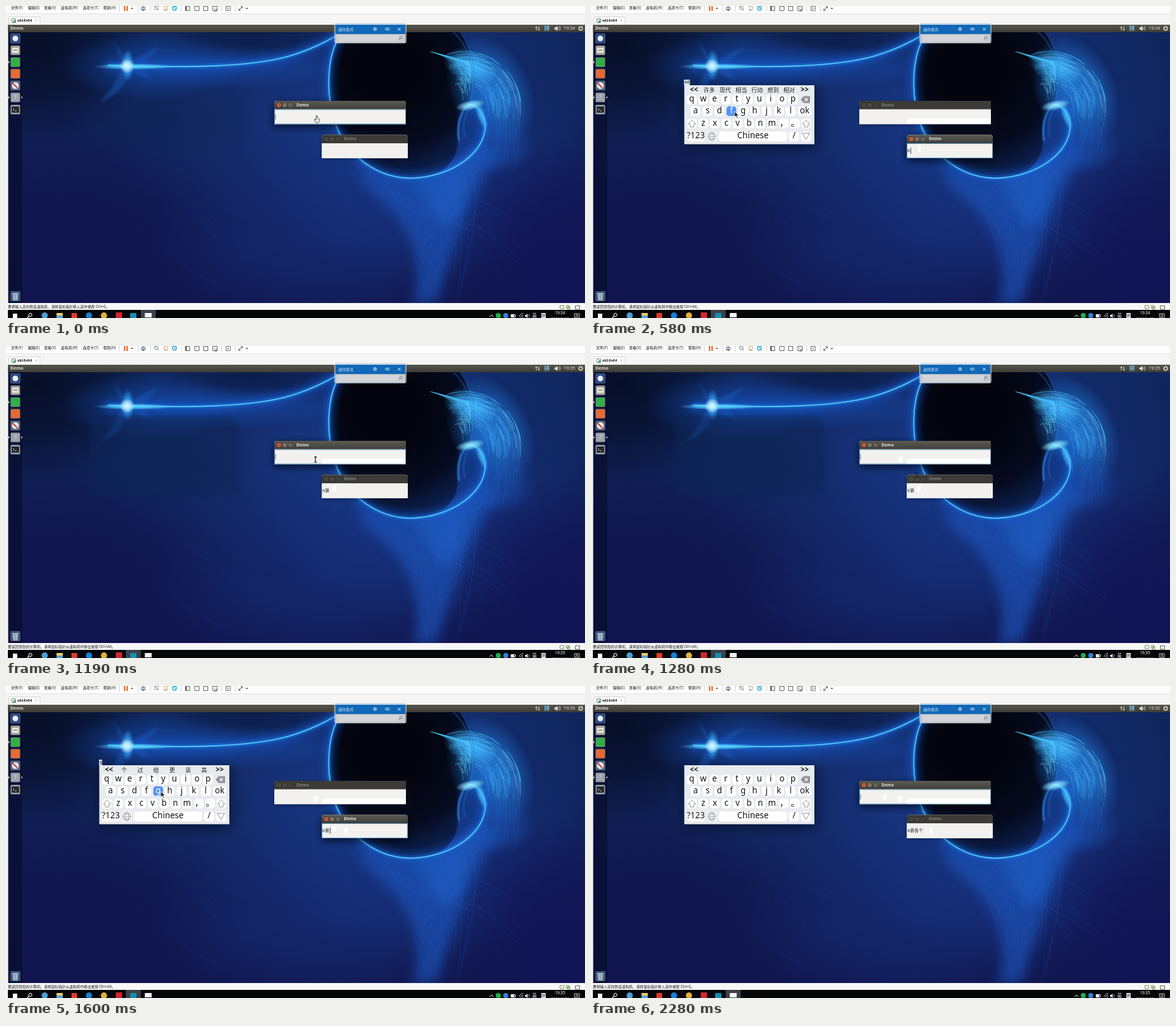
Write an HTML page with a canvas that moves like this. It is 928 px wide and 500 px high and loops after 2.36 s.

```html
<!DOCTYPE html>
<html lang="zh">
<head>
<meta charset="utf-8">
<title>Virtual keyboard demo</title>
<style>
html, body { margin: 0; width: 100%; height: 100%; overflow: hidden; background: #000; }
canvas { display: block; width: 928px; height: 500px; }
</style>
</head>
<body>
<canvas id="stage" width="928" height="500"></canvas>
<script>
const W = 928, H = 500, LOOP = 2360;
const SANS = '"Noto Sans", "Noto Sans CJK SC", "Noto Sans CJK", sans-serif';
const CJK = '"Noto Sans CJK SC", "Noto Sans CJK", sans-serif';
const screen = document.getElementById('stage').getContext('2d');
const back = document.createElement('canvas');
back.width = W;
back.height = H;
let c = back.getContext('2d');

let seed = 7;
const rnd = () => (seed = (seed * 16807) % 2147483647) / 2147483647;
const span = (a, b) => a + (b - a) * rnd();

function rect(x, y, w, h, fill, r = 0) {
  c.fillStyle = fill;
  c.beginPath();
  c.roundRect(x, y, w, h, r);
  c.fill();
}
function dot(x, y, r, fill) {
  c.fillStyle = fill;
  c.beginPath();
  c.arc(x, y, r, 0, 7);
  c.fill();
}
function ring(x, y, r, color, w = 1) {
  c.strokeStyle = color;
  c.lineWidth = w;
  c.beginPath();
  c.arc(x, y, r, 0, 7);
  c.stroke();
}
function line(d, color, w = 1) {
  c.strokeStyle = color;
  c.lineWidth = w;
  c.stroke(new Path2D(d));
}
function shape(d, fill) {
  c.fillStyle = fill;
  c.fill(new Path2D(d));
}
function text(s, x, y, size, color, align = 'left', font = SANS, weight = 400) {
  c.font = `${weight} ${size}px ${font}`;
  c.textAlign = align;
  c.textBaseline = 'middle';
  c.fillStyle = color;
  c.fillText(s, x, y);
}
function ramp(y0, y1, a, b) {
  const g = c.createLinearGradient(0, y0, 0, y1);
  g.addColorStop(0, a);
  g.addColorStop(1, b);
  return g;
}
function blob(x, y, rx, ry, rgb, a, rot = 0) {
  c.save();
  c.translate(x, y);
  c.rotate(rot);
  c.scale(rx, ry);
  const g = c.createRadialGradient(0, 0, 0, 0, 0, 1);
  g.addColorStop(0, `rgba(${rgb},${a})`);
  g.addColorStop(0.5, `rgba(${rgb},${a * 0.65})`);
  g.addColorStop(1, `rgba(${rgb},0)`);
  c.fillStyle = g;
  c.fillRect(-1, -1, 2, 2);
  c.restore();
}
function glow(d, w) {
  c.save();
  c.lineCap = 'round';
  c.filter = 'blur(7px)';
  line(d, 'rgba(22,90,205,.75)', w * 7);
  c.filter = 'blur(2px)';
  line(d, 'rgba(30,135,240,.85)', w * 2.4);
  c.filter = 'none';
  line(d, '#5fd0fb', w);
  c.restore();
}

function wallpaper() {
  c.save();
  c.beginPath();
  c.rect(3, 42, 925, 434);
  c.clip();
  rect(3, 42, 925, 434, ramp(42, 476, '#10265c', '#11164f'));
  blob(470, 180, 330, 190, '22,48,116', 0.85);
  blob(520, 370, 290, 150, '21,42,112', 0.85);
  blob(660, 190, 300, 250, '25,62,148', 0.75);
  blob(840, 110, 150, 130, '15,38,96', 0.6);
  blob(875, 400, 150, 190, '18,20,88', 0.85);
  blob(80, 400, 260, 210, '17,20,78', 0.9);
  blob(50, 60, 190, 165, '6,13,36', 0.95);
  blob(400, 45, 170, 45, '9,25,64', 0.7);
  blob(255, 180, 150, 80, '14,37,84', 0.6);

  // beam and its star
  blob(235, 96, 150, 55, '20,72,165', 0.7);
  blob(350, 98, 200, 35, '22,74,170', 0.6);
  c.filter = 'blur(2px)';
  shape('M165 53Q188 72 194 94Q225 70 247 67Q225 85 221 97Q224 115 245 120Q211 113 197 103Q188 143 150 153Q178 128 183 101L164 96L183 90Q183 70 165 53Z', 'rgba(25,87,180,.55)');
  c.filter = 'none';
  glow('M164 95C280 99 390 99 455 80C495 68 518 54 544 40', 1.6);
  blob(205, 97, 65, 5, '90,215,255', 1);
  blob(195, 95, 10, 26, '55,180,255', 0.9);
  blob(194, 96, 12, 12, '220,250,255', 1);

  // tail below the disc
  c.filter = 'blur(9px)';
  shape('M560 245C610 290 690 292 772 218L790 245C750 285 738 330 716 390C705 425 700 450 690 476L650 476C675 420 650 340 575 290Z', 'rgba(29,83,185,.65)');
  shape('M655 275L770 225C735 280 738 320 714 350L690 345Z', 'rgba(35,100,205,.5)');
  c.filter = 'none';
  for (let i = 0; i < 95; i++) {
    const x = span(565, 765), y = 282 - Math.abs(x - 655) * 0.25;
    const ex = span(650, 735), ey = span(320, 476);
    line(`M${x} ${y}Q${x + 28} ${y + 45} ${ex} ${ey}`, `rgba(50,125,225,${span(0.03, 0.2)})`, 0.6);
  }
  for (let i = 0; i < 26; i++) {
    const x = span(690, 745), y = span(295, 360);
    line(`M${x} ${y}q${span(25, 60)} ${span(5, 20)} ${span(70, 115)} ${span(35, 85)}`, `rgba(45,115,215,${span(0.05, 0.2)})`, 0.6);
  }
  for (let i = 0; i < 45; i++) {
    const x = span(240, 360), y = span(260, 400);
    line(`M${x} ${y}q40 55 ${span(90, 150)} ${span(55, 90)}`, `rgba(38,72,160,${span(0.04, 0.17)})`, 0.7);
  }

  // dark disc
  const disc = 'M540 42C516 70 512 132 525 180C545 247 600 276 650 276C710 274 726 240 724 210C722 180 735 163 742 157C752 115 748 70 728 42Z';
  const g = c.createRadialGradient(610, 100, 55, 620, 115, 185);
  g.addColorStop(0, '#03040d');
  g.addColorStop(0.5, '#050a1e');
  g.addColorStop(1, '#102b68');
  shape(disc, g);

  // feathered plume
  blob(777, 137, 65, 94, '33,125,222', 0.85, -0.45);
  blob(744, 97, 45, 26, '62,180,255', 0.8, 0.35);
  blob(785, 225, 65, 45, '28,90,195', 0.5);
  c.save();
  c.lineCap = 'round';
  for (let i = 0; i < 250; i++) {
    const r = span(38, 92), a = span(-1.95, -0.25);
    c.strokeStyle = `rgba(${span(45, 125)},${span(165, 225)},255,${span(0.08, 0.48)})`;
    c.lineWidth = span(0.4, 1.1);
    c.beginPath();
    c.ellipse(735, 167, r, r * 1.04, 0, a, a + span(0.15, 0.7));
    c.stroke();
  }
  for (let i = 0; i < 65; i++) {
    const x = span(680, 738), y = 73 + (x - 680) * 0.3;
    line(`M${x} ${y}Q${x + 30} ${y + 7} ${span(735, 790)} ${span(87, 135)}`, `rgba(75,195,255,${span(0.12, 0.45)})`, 0.7);
  }
  for (let i = 0; i < 55; i++) {
    const x = span(760, 823), y = span(125, 205);
    line(`M${x} ${y}q5 25 ${span(-30, 5)} ${span(40, 80)}`, `rgba(40,125,225,${span(0.08, 0.3)})`, 0.7);
  }
  for (let i = 0; i < 24; i++) {
    const x = span(722, 740), y = span(88, 130);
    line(`M${x} ${y}q7 9 7 ${span(12, 27)}`, `rgba(110,215,255,${span(0.2, 0.8)})`, 0.8);
  }
  c.restore();

  line('M717 42Q757 78 745 155', 'rgba(42,125,220,.55)', 1.2);
  line('M728 42Q762 88 744 155', 'rgba(36,100,190,.55)', 1);
  blob(747, 192, 25, 42, '16,55,132', 0.9, -0.2);
  glow('M540 42C515 70 512 132 525 180C545 245 600 276 650 276C715 274 768 235 768 192C767 171 754 158 742 158', 1.5);
  c.filter = 'blur(1px)';
  line('M744 157C730 164 721 188 726 216', 'rgba(47,155,245,.85)', 2.2);
  line('M746 160C733 174 731 195 736 211', 'rgba(40,120,220,.7)', 1.3);
  c.filter = 'none';
  blob(744, 159, 24, 8, '150,240,255', 0.95, -0.2);
  blob(762, 176, 7, 25, '75,195,255', 0.8, -0.35);
  c.restore();
}

function launcher() {
  rect(4, 42, 22, 434, 'rgba(8,14,45,.7)');
  const tile = (y, fill) => {
    rect(7, y - 8, 16, 16, 'rgba(195,210,235,.4)', 2);
    rect(8, y - 7, 14, 14, fill, 1.5);
  };
  tile(52, '#294989');
  dot(15, 52, 4.5, '#eef1f5');
  tile(71, '#aaa69d');
  rect(10, 67, 10, 8, '#e9e6dd', 1);
  rect(12, 70, 6, 1.5, '#77736a');
  tile(90, '#35ad48');
  tile(108.5, '#e66a32');
  tile(127.5, '#57657c');
  dot(15, 127.5, 5.5, '#e8e8e8');
  line('M11 124L18 131', '#c9392d', 2);
  tile(146.5, '#9fa3aa');
  text('?', 15, 146.5, 9, '#dcdde1', 'center');
  tile(166, '#a5aaae');
  rect(9, 161, 12, 10, '#26272b');
  line('M11 164L13 166L11 168M14 168H17', '#f0f0f0', 0.8);
  tile(465, '#31527d');
  shape('M10 460H20L19 472H11Z', '#8fa2b6');
  line('M10 460.5H20M13 463V470M17 463V470', '#d3dde6', 0.8);
  for (const y of [90, 146.5]) shape(`M4 ${y - 2}L6 ${y}L4 ${y + 2}Z`, '#eee');
  shape('M26 144.5L24 146.5L26 148.5Z', '#eee');
}

function hostChrome() {
  rect(0, 0, W, 30, '#fdfdfd');
  rect(0, 12, W, 1, '#e3e3e3');
  rect(0, 13, W, 17, '#f5f5f5');
  const menu = { 8: '文件(F)', 35: '编辑(E)', 61: '查看(V)', 88: '虚拟机(M)', 123: '选项卡(T)', 156: '帮助(H)' };
  for (const x in menu) text(menu[x], +x, 3, 6, '#111', 'left', CJK);
  for (const x of [181, 211, 231, 281, 345, 367]) rect(x, 0, 1, 9, '#d2d2d2');
  rect(189, 0, 2.3, 8, '#ed6b2b');
  rect(193, 0, 2.3, 8, '#ed6b2b');
  for (const x of [202, 386]) shape(`M${x - 2} 3h4l-2 2z`, '#333');
  line('M217 2H223V6H217ZM220 0V8M218 5L220 8L222 5', '#54687d', 1);
  ring(241, 3, 3, '#8b929a');
  line('M238 0L245 7', '#8b929a');
  ring(256, 3, 3, '#d9a15e');
  line('M253 7H259', '#999');
  ring(270, 3.5, 3.3, '#18a0c6', 1.3);
  line('M270 1V4H272', '#18a0c6');
  for (const x of [287, 302, 316, 331]) line(`M${x}.5 0.5h7v7h-7z`, '#666');
  rect(288, 1, 2, 6, '#777');
  line('M334 4L338 8M338 4V8H334', '#666');
  line('M352.5 .5H359.5V7.5H352.5ZM354 2L357 4L354 6', '#777');
  line('M373 7L379 1M376 1H379V4M373 4V7H376', '#555');
  rect(4, 17, 51, 13, '#fff');
  line('M4.5 30V17.5H54.5V30', '#c9c9c9', 0.8);
  line('M9.5 20.5H15.5V26.5H9.5Z', '#777');
  shape('M12 22L16 24.5L12 27Z', '#28a85a');
  text('ub16x64', 18, 23.5, 5.7, '#111', 'left', '"DejaVu Sans Mono", monospace', 700);
  line('M47 21.5L50 24.5M50 21.5L47 24.5', '#999', 0.7);
  rect(0, 30, 3.5, 457, '#f3f3f3');

  rect(3, 30, 925, 12, ramp(30, 42, '#57564e', '#3d3c37'));
  text('Demo', 7, 36, 7.2, '#e1ddd4', 'left', SANS, 700);
  line('M850 39V33L848.5 35M850 33L851.5 35M854 33V39L852.5 37M854 39L855.5 37', '#e4e0d8', 1);
  text('拼', 867, 35.5, 9, '#76c1ed', 'center', CJK, 700);
  shape('M879 34.5H881L884 32V40L881 37.5H879Z', '#e4e0d8');
  line('M885 34Q887 36 885 38M887 32.5Q890 36 887 39.5', '#e4e0d8', 0.8);
  ring(921, 36, 2.6, '#e4e0d8', 1.3);
  for (let i = 0; i < 8; i++) {
    const a = i * Math.PI / 4;
    dot(921 + 3.6 * Math.cos(a), 36 + 3.6 * Math.sin(a), 0.6, '#e4e0d8');
  }

  rect(526, 27, 116, 33, 'rgba(190,210,225,.65)', 4);
  rect(528, 30, 112, 15, '#1268b6');
  rect(528, 45, 112, 14, '#c8cbd0');
  rect(532, 47, 98, 10, '#d2d4d8');
  text('迷你查词', 532.5, 37.5, 6, '#d7ebfa', 'left', CJK);
  ring(591.5, 37, 2.4, '#d7ebfa', 0.9);
  line('M589 37H594M591.5 34.5V39.5', '#d7ebfa', 0.6);
  line('M607 37H610M610 34.5V39.5M610 35.5H614V38.5H610', '#d7ebfa', 0.8);
  line('M628 35L632.5 39.5M632.5 35L628 39.5', '#fff', 0.9);
  ring(633, 50.5, 2, '#777', 0.8);
  line('M631.5 52L629.5 54.5', '#777');

  rect(0, 476, W, 11, '#f7f7f7');
  line('M888 480H894V485H888ZM898 480H902V484H898ZM900 482H904V486H900Z', '#668c47', 0.9);
  line('M912.5 480.5H919.5V486H912.5Z', '#555', 0.9);
  rect(3, 487, 925, 13, '#05070b');
  rect(0, 487, 3, 13, '#f3f3f3');
  rect(11, 493, 7, 7, '#fff');
  ring(39, 495, 2.6, '#fff');
  line('M37 497L34 500', '#fff', 1.2);
  dot(62, 496, 5, '#4b9fd2');
  rect(81, 492, 10, 8, '#f5cd63');
  rect(81, 496, 10, 4, '#54a5d5');
  rect(105, 492, 9, 8, '#e03c25');
  dot(133, 496, 5, '#1681d5');
  dot(157, 496, 5, '#e1b03b');
  rect(176, 491, 10, 9, '#d5262e');
  line('M775 498L778 495L781 498', '#eee', 1);
  dot(789, 496, 4, '#19b34e');
  dot(801, 496, 4, '#3483d9');
  line('M809.5 494.5H816V498.5H809.5ZM817 496V497', '#fff', 1);
  rect(810, 495, 4, 3, '#fff');
  line('M822 498Q824 493 829 493M824 499Q825 496 829 496M827 499H829', '#ddd', 0.9);
  shape('M832 495H834L836 493V500L834 498H832Z', '#eee');
  line('M837.5 494Q840 496.5 837.5 499', '#eee', 0.8);
  text('英', 847, 496, 7.5, '#fff', 'center', CJK);
  rect(858, 492, 7, 8, '#f3f3f3');
  text('拼', 861.5, 496, 6, '#111', 'center', CJK);
  line('M911 493H919V499H916L914 501V499H911ZM913 495H917M913 497H917', '#eee', 0.8);
}

const rows = [
  [150, 'q w e r t y u i o p', [161.5, 180, 198, 216, 234, 252, 270, 288, 306, 324]],
  [168.5, 'a s d f g h j k l', [167.5, 187, 206, 225, 244, 262.5, 281.5, 301, 320]],
  [188.5, 'z x c v b n m ， 。', [180, 198.5, 217, 235, 253.5, 271.5, 290, 309, 327]]
];

function keyboard(s) {
  c.save();
  c.shadowColor = 'rgba(4,16,43,.85)';
  c.shadowBlur = 20;
  c.shadowOffsetY = 4;
  rect(149.5, 127, 208.5, 94.5, '#e7eaee');
  c.restore();
  const key = (x, y, w, label, color = '#151515') => {
    const hot = label && label === s.key;
    rect(x - w / 2, y - 7.8, w, 15.6, hot ? '#5290f5' : '#fff', 4.5);
    if (label) text(label, x, y - 0.5, 13.5, hot ? '#fff' : color, 'center');
  };
  text('<<', 165, 135, 11.5, '#111', 'center', SANS, 600);
  text('>>', 342.5, 135, 11.5, '#111', 'center', SANS, 600);
  if (s.words) s.words.split(' ').forEach((w, i) => text(w, 189.5 + i * 25.6, 135, 9.2, '#222', 'center', CJK));
  for (const [y, keys, xs] of rows) keys.split(' ').forEach((k, i) => key(xs[i], y, 15.5, k));
  key(342.5, 168.5, 21, 'ok');
  shape('M336 150L341 144.5H351V155.5H341Z', '#8e9194');
  line('M342.5 147.5L347.5 152.5M347.5 147.5L342.5 152.5', '#fff', 1.2);
  for (const x of [162, 345]) {
    key(x, 188.5, 15);
    line(`M${x} 182.5L${x + 6} 189H${x + 3}V194H${x - 3}V189H${x - 6}Z`, '#92969b', 1);
  }
  key(168, 209, 29, '?123');
  key(193.5, 209, 16);
  ring(193.5, 209, 6.5, '#85898e', 0.9);
  c.beginPath();
  c.ellipse(193.5, 209, 3, 6.5, 0, 0, 7);
  c.stroke();
  line('M187 209H200M188.5 205.5H198.5M188.5 212.5H198.5', '#85898e', 0.7);
  key(259.5, 209, 110, 'Chinese');
  key(325.5, 209, 16, '/');
  key(344.5, 209, 16);
  line('M338.5 204H350.5L344.5 214Z', '#898d92', 1);
  if (s.pre) {
    rect(149, 118, s.pre.length * 4.2 + 1, 9, '#d9e4f2');
    text(s.pre, 149.8, 122, 7, '#111');
  }
}

function appWindow(x, y, w, h, focus) {
  c.save();
  c.shadowColor = focus ? 'rgba(0,4,18,.8)' : 'rgba(4,19,53,.5)';
  c.shadowBlur = focus ? 14 : 7;
  c.shadowOffsetY = focus ? 4 : 2;
  rect(x, y, w, h, '#f2f1f0', [4, 4, 0, 0]);
  c.restore();
  rect(x, y, w, 13.5, focus ? ramp(y, y + 13, '#5c5b53', '#403f3a') : '#3c3b37', [4, 4, 0, 0]);
  const cy = y + 6.8, ink = focus ? '#32312d' : '#282724';
  [7.5, 16.7, 26].forEach((dx, i) => {
    dot(x + dx, cy, 4, ink);
    dot(x + dx, cy, 3.3, focus ? (i ? '#858279' : '#ec6540') : '#53514c');
  });
  line(`M${x + 6} ${cy - 1.5}l3 3m0-3l-3 3M${x + 15} ${cy}h3.5M${x + 24.5} ${cy - 1.5}h3v3h-3z`, ink, 0.8);
  text('Demo', x + 35.5, cy, 6.8, focus ? '#e7e3da' : '#85827b', 'left', SANS, 700);
  if (focus) {
    c.strokeStyle = '#5f9cc4';
    c.lineWidth = 1;
    c.strokeRect(x + 0.5, y + 14, w - 1, h - 14.5);
  }
}

function beam(x, y, color) {
  line(`M${x - 2} ${y - 4.5}Q${x} ${y - 4.5} ${x} ${y - 3}V${y + 3}Q${x} ${y + 4.5} ${x - 2} ${y + 4.5}M${x + 2} ${y - 4.5}Q${x} ${y - 4.5} ${x} ${y - 3}M${x} ${y + 3}Q${x} ${y + 4.5} ${x + 2} ${y + 4.5}`, color, 1.3);
}
function pointer(kind, x, y) {
  c.save();
  if (kind === 'beam') beam(x, y, '#222');
  if (kind === 'faint') beam(x, y, '#999');
  c.translate(x, y);
  const d = kind === 'arrow'
    ? 'M0-3V6L2.2 4L3.8 7.5L5.4 6.7L3.8 3.5H7Z'
    : 'M-1-5Q0-6 1-5V-1L4 0V4L2 6H-1L-4 1L-3 0L-1 2Z';
  if (kind === 'arrow' || kind === 'hand') {
    shape(d, kind === 'arrow' ? '#1a1a1a' : '#fff');
    line(d, kind === 'arrow' ? '#fff' : '#222', 0.8);
  }
  c.restore();
}

// each step lists only what changes
const steps = [
  [0, { top: true, keys: false, body: '', host: true, icon: 228, clock: '19:34', cur: ['hand', 498, 181], key: '', pre: '', words: '' }],
  [70, { host: false, icon: 204, cur: ['beam', 526, 229] }],
  [150, { top: false, keys: true }],
  [240, { cur: ['arrow', 257, 191], key: 'b' }],
  [320, { body: 'b', key: '' }],
  [410, { cur: ['arrow', 203, 191], key: 'x', pre: 'x', words: '下 小 想 新 需 先' }],
  [490, { cur: ['arrow', 211, 172], key: 'd', pre: 'xd', words: '许多 现代 相当 行动 想到 相对' }],
  [580, { cur: ['arrow', 230, 172], key: 'f' }],
  [650, { cur: ['arrow', 343, 137], key: '' }],
  [730, { words: '兄弟 心得 小的 学到 下的 新的' }],
  [800, { cur: ['arrow', 192, 137] }],
  [880, { cur: ['arrow', 202, 151], key: 'e', body: 'b兄弟', pre: '', words: '' }],
  [960, { cur: ['arrow', 345, 151], key: '', body: 'b', clock: '19:35' }],
  [1040, { body: 'b第', cur: ['arrow', 346, 210] }],
  [1120, { keys: false, cur: ['beam', 496, 182] }],
  [1190, { top: true }],
  [1270, { cur: ['beam', 522, 207] }],
  [1350, { top: false, cur: ['beam', 545, 232] }],
  [1510, { keys: true }],
  [1590, { cur: ['arrow', 248, 172], key: 'g', pre: 'g', words: '个 过 给 更 该 高' }],
  [1670, { pre: 'gg', words: '各个 哥哥 刚刚 公共 更改 广告' }],
  [1740, { key: '', cur: ['arrow', 192, 137] }],
  [1820, { body: 'b第各个', pre: '', words: '' }],
  [1900, { cur: ['beam', 410, 166] }],
  [1980, { cur: ['faint', 471, 178] }],
  [2130, { top: true }],
  [2210, { host: true }],
  [2280, { icon: 228, cur: ['none', 0, 0] }]
];
const marks = [[526, 229, 240, 1820], [496, 182, 1270, LOOP], [545, 232, 1590, LOOP], [471, 178, 2280, LOOP]];

function draw(t) {
  const s = {};
  for (const [at, change] of steps) if (t >= at) Object.assign(s, change);
  c.drawImage(back, 0, 0);
  text(s.clock, 903, 36, 7.2, '#e4e0d8', 'center');
  if (t >= 1040 && !s.keys) {
    c.save();
    c.filter = 'blur(3px)';
    rect(135, 113, 238, 128, 'rgba(14,39,86,.5)', 20);
    c.restore();
  }
  appWindow(430, 152, 211, 37.5, s.top);
  appWindow(506, 206.5, 138, 37.5, !s.top);
  if (t >= 150) rect(506, 180.5, 134, 8, '#fff', [5, 0, 0, 0]);
  for (const [x, y, from, to] of marks) {
    if (t >= from && t < to) rect(x - 2.5, y - 5, 5, 10, '#fff', 2);
  }
  if (s.body) text(s.body, 507, 232, 7, '#222');
  if (s.top) rect(431.5, 173, 0.8, 9, '#444');
  else if (t < 1980) rect(508 + c.measureText(s.body).width * (s.body ? 1 : 0), 227, 0.8, 10, '#222');
  if (s.keys) keyboard(s);
  pointer(...s.cur);

  text(s.host ? '要将输入定向到该虚拟机，请将鼠标指针移入其中或按 Ctrl+G。' : '要返回到您的计算机，请将鼠标指针从虚拟机中移出或按 Ctrl+Alt。',
    3, 482, 5.8, '#111', 'left', CJK);
  rect(s.icon - 12, 487, 24, 13, '#3b4148');
  rect(199, 492, 10, 8, '#168eb0');
  rect(222.5, 492, 11, 7, '#f6f6f6');
  text(s.clock, 888, 492, 6.3, '#fff', 'center');
  text('2020/1/20', 888, 501, 6, '#ccc', 'center');
}

wallpaper();
launcher();
hostChrome();
c = screen;
function tick(now) {
  draw(now % LOOP);
  requestAnimationFrame(tick);
}
draw(0);
requestAnimationFrame(tick);
</script>
</body>
</html>
```
